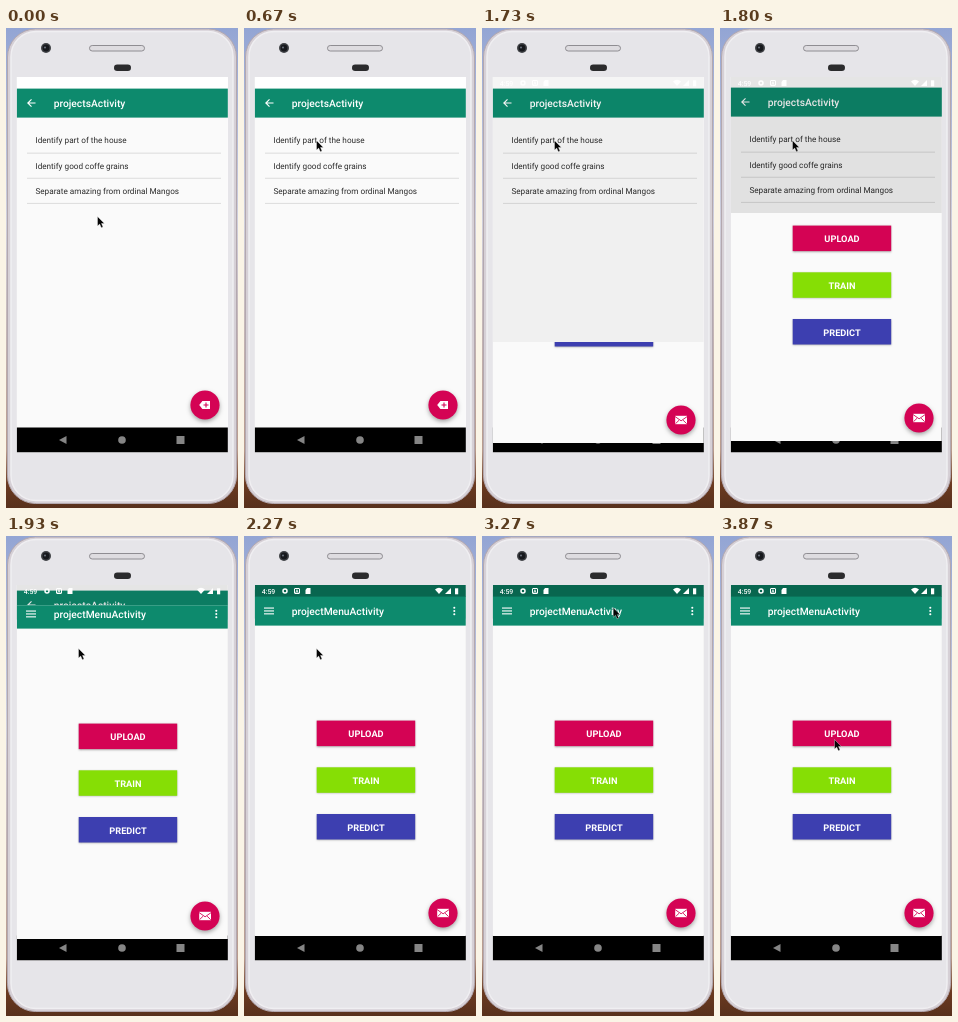
Animation of 232 by 480 pixels, one loop 3940 ms. Source, as an HTML page with a canvas:

```html
<!DOCTYPE html>
<html lang="en">
<head>
<meta charset="utf-8">
<title>Project list to project menu</title>
<style>
  html, body { margin: 0; width: 100%; height: 100%; overflow: hidden; }
  canvas { display: block; width: 100vw; height: 100vh; }
</style>
</head>
<body>
<canvas id="stage" width="232" height="480"></canvas>
<script>
const ctx = document.getElementById('stage').getContext('2d');
ctx.textRendering = 'geometricPrecision';
const LOOP = 3940, STEP = 200 / 3;
const LEFT = 10.7, TOP = 49, WIDTH = 211.2, BOTTOM = 424.5, HEIGHT = BOTTOM - TOP;
const TEAL = '#0d8a6d', PINK = '#d40354', PAGE = '#fafafa';

const progress = (t, start, end) => Math.min(1, Math.max(0, (t - start) / (end - start)));
const smooth = p => p * p * (3 - 2 * p);
const fastOutSlowIn = p => 1 - (1 - p ** 2.5) ** 6;
const decelerate = p => 1 - (1 - p) ** 3.5;

function pointerAt(t) {
  const toRow = smooth(progress(t, 0, 600));
  const toTitle = smooth(progress(t, 2870, 3280));
  const toButton = smooth(progress(t, 3330, 3850));
  return [
    91 - 19 * toRow + 59 * toTitle - 17 * toButton,
    188 - 76 * toRow - 41 * toTitle + 132 * toButton
  ];
}

function rect(x, y, w, h, color) {
  ctx.fillStyle = color;
  ctx.fillRect(x, y, w, h);
}

function strip(y, h, color) {
  rect(LEFT, y, WIDTH, h, color);
}

function paint(fill, stroke, line = 1) {
  if (fill) { ctx.fillStyle = fill; ctx.fill(); }
  if (stroke) { ctx.strokeStyle = stroke; ctx.lineWidth = line; ctx.stroke(); }
}

function pill(x, y, w, h, r, fill, stroke, line) {
  ctx.beginPath();
  ctx.roundRect(x, y, w, h, r);
  paint(fill, stroke, line);
}

function disc(x, y, r, fill, stroke, line) {
  ctx.beginPath();
  ctx.arc(x, y, r, 0, Math.PI * 2);
  paint(fill, stroke, line);
}

function path(d, x, y, fill, stroke, line) {
  ctx.save();
  ctx.translate(x, y);
  const p = new Path2D(d);
  if (fill) { ctx.fillStyle = fill; ctx.fill(p); }
  if (stroke) { ctx.strokeStyle = stroke; ctx.lineWidth = line; ctx.stroke(p); }
  ctx.restore();
}

function text(str, x, y, size, color, weight = 400, align = 'left') {
  ctx.font = `${weight} ${size}px Roboto, sans-serif`;
  ctx.textAlign = align;
  ctx.fillStyle = color;
  ctx.fillText(str, x, y);
}

function withShadow(blur, dy, draw) {
  ctx.save();
  ctx.shadowColor = 'rgba(0,0,0,.35)';
  ctx.shadowBlur = blur;
  ctx.shadowOffsetY = dy;
  draw();
  ctx.restore();
}

function clipped(x, y, w, h, draw) {
  ctx.save();
  ctx.beginPath();
  ctx.rect(x, y, w, h);
  ctx.clip();
  draw();
  ctx.restore();
}

function phone() {
  const backdrop = ctx.createLinearGradient(0, 0, 0, 480);
  backdrop.addColorStop(0, '#93a5d4');
  backdrop.addColorStop(.4, '#cfcfdd');
  backdrop.addColorStop(.88, '#b89a8c');
  backdrop.addColorStop(.95, '#6b3a20');
  backdrop.addColorStop(1, '#57301c');
  rect(0, 0, 232, 480, backdrop);
  pill(1.5, 1, 229, 474.5, 28, '#d6d0d6', '#b3a8af');
  pill(5, 3.5, 222, 469, 25, '#e6e5e9', '#f0eff2', 1.5);
  pill(83.5, 17.5, 55, 5.5, 2.7, '#dedce0', '#8f8d92');
  disc(40, 20, 5, '#3f4145');
  disc(40, 20, 3.4, '#17191d');
  disc(39, 19.5, 1.1, '#666d78');
  pill(108, 36.5, 17, 6.5, 3.2, '#2b2b2d');
}

function navBar() {
  strip(399.5, 25, '#000');
  path('M0 0L7.5 -4V4Z', 53, 412, '#858585');
  disc(116, 412, 3.8, '#858585');
  rect(170.5, 408, 8, 8, '#858585');
}

function statusIcons() {
  const white = '#fff';
  text('4:59', 17.7, 57.5, 6.9, white, 500);
  disc(41, 55, 2, null, white, 1.5);
  pill(50.5, 52.5, 5, 5, .5, null, white);
  text('A', 53, 57, 5, white, 700, 'center');
  path('M0 2L1.5 0H5V6H0Z', 61.5, 52, white);
  path('M-4 -4.5Q0 -8 4 -4.5L0 0Z', 195, 58, white);
  path('M0 0L6 -6V0Z', 201, 58, white);
  rect(211, 52.3, 3.2, 6, white);
}

function toolbar(title) {
  strip(60.6, 29, TEAL);
  text(title, 47.7, 79, 10.27, '#fff', 500);
}

function fab() {
  withShadow(4, 2, () => disc(199, 377, 14.6, PINK));
}

function ripple(t) {
  const spread = progress(t, 950, 1270);
  const strength = spread * (1 - progress(t, 1335, 1470));
  clipped(21, 99.7, 194, 25.3, () => {
    rect(21, 99, 194, 27, `rgba(0,0,0,${.06 * strength})`);
    disc(72, 112, 170 * spread, `rgba(0,0,0,${.08 * strength})`);
  });
}

function listPage(t) {
  strip(TOP, HEIGHT, PAGE);
  strip(TOP, 12, '#fff');
  toolbar('projectsActivity');
  path('M8 0H.5M4 -3.7L.3 0L4 3.7', 21.5, 75, null, '#fff', 1.1);
  ripple(t);
  ['Identify part of the house', 'Identify good coffe grains',
   'Separate amazing from ordinal Mangos'].forEach((label, i) => {
    text(label, 29.4, 115.4 + i * 25.3, 8.2, '#2b2b2b');
    rect(21, 124.7 + i * 25.1, 194, .8, '#d4d4d4');
  });
  fab();
  path('M-5.8 0L-2.6 -4H5V4H-2.6Z', 199, 377, '#fff');
  path('M-1.5 0H3.5M1 -2.5V2.5', 199, 377, null, PINK, 1.1);
}

function menuPage() {
  strip(TOP, 351, PAGE);
  strip(TOP, 12, '#08664f');
  toolbar('projectMenuActivity');
  for (let i = -1; i <= 1; i++) {
    rect(20, 74.4 + i * 2.9, 10, 1.1, '#fff');
    disc(210.3, 75 + i * 3.2, 1.05, '#fff');
  }
  [['UPLOAD', PINK], ['TRAIN', '#86de05'], ['PREDICT', '#3d3fb0']].forEach(([label, color], i) => {
    const y = 184.6 + i * 46.7;
    withShadow(2, .5, () => rect(72.7, y, 98.5, 25.5, color));
    text(label, 122, y + 16.6, 9.24, '#fff', 700, 'center');
  });
  fab();
  rect(193.2, 372.8, 11.8, 8.4, '#fff');
  path('M-6 -3.4L0 .8L6 -3.4M-5.6 3.7L-2 .2M5.6 3.7L2 .2', 199.1, 377, null, PINK, .9);
}

function pointer(x, y) {
  path('M0 0V9.6L2.2 7.6L3.8 11.2L5.5 10.4L4 7H6.9Z', x + .5, y + .5,
    '#050505', 'rgba(255,255,255,.7)', .5);
}

// The new page slides up a little while its visible area grows from the bottom.
function screen(t) {
  const opening = progress(t, 1693, 2118);
  const slide = fastOutSlowIn(opening);
  const revealTop = BOTTOM - HEIGHT * decelerate(opening);

  strip(TOP, HEIGHT, '#fff');
  ctx.save();
  ctx.translate(0, Math.round(-7.5 * slide));
  listPage(t);
  ctx.restore();
  strip(TOP, HEIGHT, `rgba(0,0,0,${.1 * Math.min(1, opening * 4)})`);
  navBar();

  clipped(LEFT, revealTop, WIDTH, HEIGHT, () => {
    ctx.translate(0, Math.round(15.4 * (1 - slide)));
    menuPage();
  });
  statusIcons();
}

function draw(t) {
  phone();
  clipped(LEFT, TOP, WIDTH, HEIGHT, () => screen(t));
  pointer(...pointerAt(t));
}

function tick() {
  const t = performance.now() % LOOP;
  draw(Math.floor((t + 4) / STEP) * STEP);
  requestAnimationFrame(tick);
}
tick();
</script>
</body>
</html>
```
